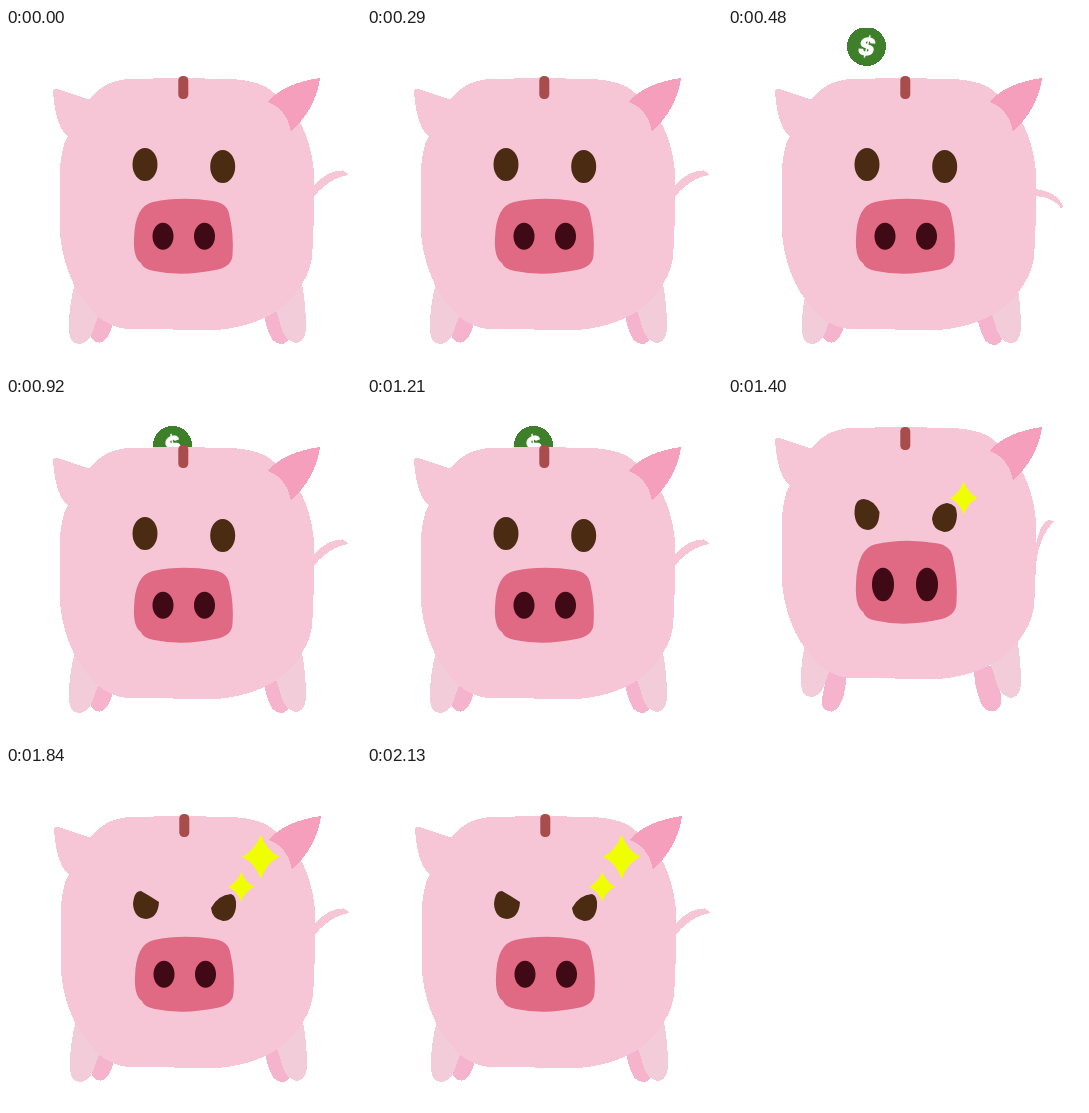
An HTML page that plays this animation: 355 px wide and 341 px high, repeating every 2.32 s.

```html
<!DOCTYPE html>
<html lang="en">
<head>
<meta charset="utf-8">
<title>Piggy bank</title>
<style>
  html, body { margin: 0; width: 100%; height: 100%; overflow: hidden; background: #fff; }
  svg { display: block; width: 100%; height: 100%; }
  text { font: italic 900 25px Inter, sans-serif; fill: #fff; text-anchor: middle; }
  .crisp { shape-rendering: crispEdges; }
  .pink { fill: #f6c6d7; }
  .near { fill: #f3ccda; }
  .far { fill: #f5b4cb; }
  .eye { fill: #4b2c12; }
  .nostril { fill: #3f0a16; }
  .star { fill: #f0ff00; }
</style>
</head>
<body>
<svg viewBox="0 0 355 341">
  <g id="coin">
    <circle class="crisp" r="19.5" fill="#3e802a"/>
    <text y="9">$</text>
  </g>
  <g id="legs" class="crisp">
    <path class="far" d="M84 304Q85 315 94 314.500Q104 312 107.500 292L110 270H91Z"/>
    <path class="far" d="M256 270L258.500 290Q262 305 266 311Q271 317 278 315.500Q286 312 284 300L278 270Z"/>
    <path class="near" d="M70 250Q62 280 63 303Q64 316 74 316Q85 314 89 296L104 262Z"/>
    <path class="near" d="M295 250Q300 275 300 300Q299 314 290 315Q278 313 274 295L262 258Z"/>
  </g>
  <path id="tail" class="pink crisp"/>
  <g id="body" class="crisp">
    <path class="pink" d="M47 62Q50 60 54 62Q78 70 88 73L72 110L62 109Q49 98 47 62Z"/>
    <path class="pink" d="M83 72Q97 53 122 51L172 50L225 51Q257 53 268 65Q285 78 296 98Q305 117 307.500 140Q309 185 306 230Q303 248 290 265Q265 297 211 302L122 301Q100 299 86 282Q70 265 63 245Q54 222 54 200V140Q56 117 62 108Q70 85 83 72Z"/>
    <path fill="#f59fbc" d="M314 50Q278 55 261.500 74Q281 81 285 104Q310 80 314 50Z"/>
  </g>
  <rect id="slot" x="172.300" y="48" width="10" height="23" rx="4.500" fill="#a84c4c"/>
  <path id="leftEye" class="eye"/>
  <path id="rightEye" class="eye"/>
  <path id="snout" fill="#e06984" d="M147 174Q175 168 207 173Q222 175 223.500 188Q228 207 226.500 227Q226 238 212 241.500Q177 249 148 243Q137 241 135 235Q127 230 128 210Q129 178 147 174Z"/>
  <ellipse id="leftNostril" class="nostril"/>
  <ellipse id="rightNostril" class="nostril"/>
  <path id="stars" class="star"/>
</svg>
<script>
const oval = (x, y, rx, ry) => `M${x - rx} ${y}a${rx} ${ry} 0 1 0 ${2 * rx} 0a${rx} ${ry} 0 1 0 ${-2 * rx} 0Z`;

// Four-pointed sparkle with concave sides.
const star = (x, y, w, h) => {
  const a = w * 0.3, b = h * 0.3;
  return `M${x} ${y - h}Q${x + a} ${y - b} ${x + w} ${y}Q${x + a} ${y + b} ${x} ${y + h}` +
    `Q${x - a} ${y + b} ${x - w} ${y}Q${x - a} ${y - b} ${x} ${y - h}Z`;
};

const rest = {
  hold: 480, body: [0, 0], slot: [0, 0], legs: Array(4).fill([0, 0]),
  tail: 'M304 162Q320 142 337 142.500L343 147Q323 149 304 173Z',
  eyes: [oval(139, 136.5, 12.5, 16.5), oval(216.7, 138.5, 12.5, 16.5)],
  snout: 'translate(0 0)', nostrils: [157, 198.5, 208.3, 10.5, 13.5], coin: '', stars: ''
};

const poses = [
  rest,
  {
    ...rest, hold: 440, coin: 'translate(138.500 18.500) rotate(5)',
    legs: [[10, 0], [-9, 1], [11, 0], [-7, 0.5]],
    tail: 'M304 161Q328 162 335 178L333 180.500Q325 168 304 168Z'
  },
  { ...rest, coin: 'translate(166.500 48.500) rotate(-20)' },
  {
    ...rest, hold: 440, body: [0, -20], slot: [0, -18],
    legs: [[9.5, 0], [-11, -1.5], [10, -16], [-7, -14]],
    tail: 'M304 172Q309 126 321 123L326 124.500Q311 139 308 168Z',
    eyes: [
      'M126.500 117Q126 102 136 102Q146 103 151.500 115Q151 132 140 133Q128 132 126.500 117Z',
      'M204 122Q206 108 219 106Q229 107 229 118Q228 135 216 135Q205 133 204 122Z'
    ],
    snout: 'matrix(1.02 0 0 1.108 -2.600 -45.500)',
    nostrils: [155, 199, 187.5, 11, 16.8],
    stars: star(235.7, 101, 13.5, 16.5)
  },
  {
    ...rest, body: [1, 0], slot: [1, 0], legs: Array(4).fill([1, 0]),
    eyes: [
      'M127 138Q128 125 135 125Q144 130 153 136Q152 152 140 153Q128 152 127 138Z',
      'M205 142Q212 129 225 128Q231 130 230 141Q228 155 217 155Q206 153 205 142Z'
    ],
    snout: 'translate(1 0)', nostrils: [158, 199.5, 208.3, 10.5, 13.5],
    stars: star(254.7, 90.7, 18.5, 22) + star(235.2, 120.7, 13, 14.7)
  }
];
const loop = poses.reduce((sum, pose) => sum + pose.hold, 0);

const el = id => document.getElementById(id);
const set = (node, attrs) => Object.entries(attrs).forEach(([k, v]) => node.setAttribute(k, v));
const shift = ([x, y]) => `translate(${x} ${y})`;

function show(pose) {
  set(el('body'), { transform: shift(pose.body) });
  set(el('slot'), { transform: shift(pose.slot) });
  [...el('legs').children].forEach((leg, i) => set(leg, { transform: shift(pose.legs[i]) }));
  set(el('tail'), { d: pose.tail, transform: shift([pose.body[0], 0]) });
  set(el('leftEye'), { d: pose.eyes[0] });
  set(el('rightEye'), { d: pose.eyes[1] });
  set(el('snout'), { transform: pose.snout });
  const [left, right, cy, rx, ry] = pose.nostrils;
  set(el('leftNostril'), { cx: left, cy, rx, ry });
  set(el('rightNostril'), { cx: right, cy, rx, ry });
  set(el('coin'), { transform: pose.coin, visibility: pose.coin ? 'visible' : 'hidden' });
  set(el('stars'), { d: pose.stars });
}

const start = performance.now();
let current;
function tick() {
  let t = (performance.now() - start) % loop;
  const pose = poses.find(p => (t -= p.hold) < 0);
  if (pose !== current) show(current = pose);
  requestAnimationFrame(tick);
}
tick();
</script>
</body>
</html>
```
